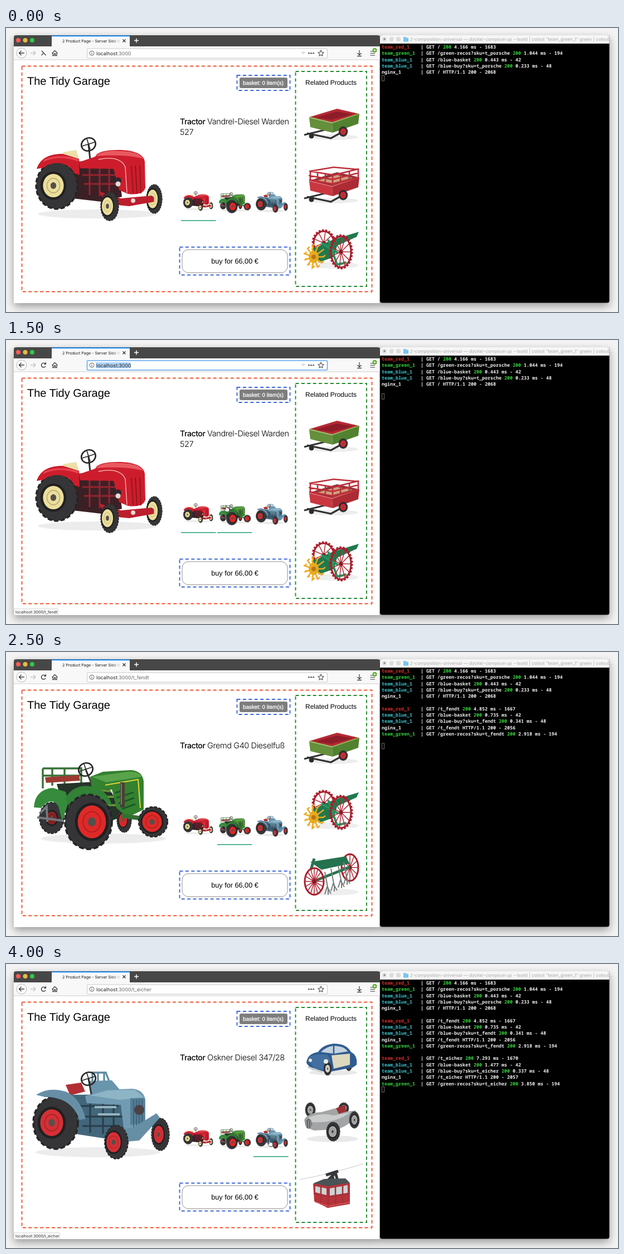
Recreate the animation shown at these times as an HTML page. Size 1098 by 510 pixels, loop 5 s.

```html
<!DOCTYPE html>
<html lang="en">
<head>
<meta charset="utf-8">
<title>Product page</title>
<style>
html, body { margin: 0; height: 100%; overflow: hidden; background: #f4f4f4; }
svg { display: block; width: 100vw; height: 100vh; }
text { white-space: pre; text-rendering: geometricPrecision; }
.ui { font-family: Inter, sans-serif; }
.page { font-family: "Liberation Sans", Arial, sans-serif; }
.mono { font: 600 8.333px "Noto Sans Mono", monospace; }
.shadow { filter: drop-shadow(0 6px 8px rgba(0,0,0,.38)); }
</style>
</head>
<body>
<svg id="stage" viewBox="0 0 1098 510"></svg>
<script>
// Drawing helpers
const E = (x, y, rx, ry, fill, more = '') => `<ellipse cx="${x}" cy="${y}" rx="${rx}" ry="${ry}" fill="${fill}" ${more}/>`;
const C = (x, y, r, fill, more) => E(x, y, r, r, fill, more);
const R = (x, y, w, h, fill, more = '') => `<rect x="${x}" y="${y}" width="${w}" height="${h}" fill="${fill}" ${more}/>`;
const P = (d, fill) => `<path d="${d}" fill="${fill}"/>`;
const L = (d, stroke, w = 1, more = '') => `<path d="${d}" fill="none" stroke="${stroke}" stroke-width="${w}" ${more}/>`;
const T = (x, y, size, str, more = 'class="ui"') => `<text x="${x}" y="${y}" font-size="${size}" ${more}>${str}</text>`;
const dashed = (x, y, w, h, color) => R(x, y, w, h, 'none', `stroke="${color}" stroke-width="1.9" stroke-dasharray="6 4.4"`);

const wheel = (x, y, rx, ry, rim, dx = 0, k = .54) =>
  E(x, y, rx - 1, ry - 1, '#353537', `stroke="#242426" stroke-width="${rx / 12}" stroke-dasharray="${rx / 5} ${rx / 9}"`) +
  E(x + dx, y, rx * (k + .12), ry * (k + .1), '#202022') +
  E(x + dx, y, rx * k, ry * k, rim) +
  E(x + dx, y, rx * k * .62, ry * k * .62, 'none', `stroke="#0003" stroke-width="${rx / 20}"`) +
  E(x + dx, y, rx * k * .28, ry * k * .28, '#55504a');

const steering = (x, y, bx, by) =>
  L(`M${x} ${y}L${bx} ${by}`, '#333', 3) +
  E(x, y, 13, 11.5, 'none', `stroke="#252525" stroke-width="2.6" transform="rotate(-25 ${x} ${y})"`) +
  L(`M${x - 11} ${y + 3}L${x + 11} ${y - 4}M${x - 3} ${y - 10}L${x + 3} ${y + 9}`, '#252525', 1.6);

const spoked = (x, y, rx, ry, n, teeth) => {
  let d = '';
  for (let i = 0; i < n; i++) {
    const a = i * 2 * Math.PI / n;
    d += `M${x} ${y}l${rx * Math.cos(a)} ${ry * Math.sin(a)}`;
  }
  const ring = (grow, w, dash) => E(x, y, rx + grow, ry + grow, 'none', `stroke="#a81f2c" stroke-width="${w}" ${dash}`);
  return L(d, '#b22835', 1.5) + ring(0, 3, '') + (teeth ? ring(2, 3, 'stroke-dasharray="3.5 2.6"') : '') + C(x, y, 3.6, '#8d1823');
};

const redTractor =
  E(165, 334, 108, 8, '#ececec') +
  P('M102 223L126 219L131 235L109 238Z', '#eddfa9') +
  P('M112 240L200 238L208 303L172 312L120 306Z', '#3b2025') +
  L('M133 250H190M137 264H196M140 280H197M150 247V300M168 246V302M185 248V300', '#942430', 3) +
  wheel(266, 307, 15, 27, '#ecdf9c', -3, .62) +
  wheel(91, 283, 38, 43, '#ecdf9c', -6, .49) +
  P('M55 253C62 232 80 226 102 226L131 235L132 264L123 261C113 240 85 237 67 251Z', '#cd1d2c') +
  P('M66 241Q95 226 130 240L129 235Q94 225 69 236Z', '#e64551') +
  steering(148, 209, 151, 236) +
  P('M131 241L160 231Q165 218 207 219Q246 221 249 240L250 287Q246 301 219 298L203 291L193 253L133 252Z', '#cd1d2c') +
  P('M161 230Q173 218 207 221Q239 222 246 235Q218 226 161 230Z', '#e85960') +
  L('M166 236Q205 228 214 250L217 296', '#f1c1bd', 1.3) +
  L('M225 248L228 296M232 247L235 298M240 247L242 297', '#98151f', 2) +
  C(201, 274, 6, '#30292c') + C(201, 280, 4.5, '#dedede') +
  P('M166 293L206 306L262 301L266 312L221 320L181 316Z', '#bd1e2c') +
  C(228, 310, 4, '#e5dad4') +
  wheel(186, 320, 17, 27, '#ecdf9c', -4, .59);

const greenTractor =
  E(175, 335, 112, 9, '#ececec') +
  wheel(82, 298, 23, 29, '#8b2323', 0, .4) +
  L('M66 209H136M66 222H136M66 209V245M83 208V240M105 208V240M135 207V244', '#397239', 3.4) +
  P('M70 225L131 221L133 231L72 235Z', '#9d3931') +
  P('M91 237L177 232L214 293L185 305L110 300Z', '#263329') +
  L('M145 246L188 250M168 260H207M174 275H210', '#64923b', 4) +
  P('M50 279Q52 247 84 244L107 251L112 269L101 304L94 277Q82 258 63 280Z', '#368b3c') +
  P('M106 263Q121 237 151 241Q181 245 190 275L176 270Q144 242 117 283Z', '#328136') +
  wheel(212, 302, 14, 23, '#df2928', -2, .52) +
  steering(143, 211, 155, 240) +
  P('M151 224L174 215L224 212Q244 213 247 232L247 283L218 297L198 280L190 247L154 246Z', '#34812f') +
  P('M154 224L220 215Q239 214 243 224L180 234Z', '#59a34b') +
  L('M178 239L237 229L241 280', '#d7d53b', 2.1) +
  L('M196 253L211 248M198 262L229 252M202 272L230 262M208 282L232 273', '#1d5827', 3) +
  L('M209 234V279', '#4c3d36', 8) + L('M207 236V274', '#968277', 1.5) +
  L('M208 294L252 300', '#346f31', 8) +
  wheel(264, 305, 27, 28, '#df2928', -2, .65) +
  wheel(148, 305, 43, 50, '#df2928', 6, .59) +
  L('M61 289L73 278L74 305M56 297L103 303', '#73787a', 4);

const blueTractor =
  E(165, 338, 112, 9, '#ececec') +
  L('M155 214V195H179L188 218M165 194V215M176 195V219', '#5d8ba4', 3.3) +
  P('M151 210L190 209L207 229L152 239Z', '#6995ad') +
  P('M107 217L135 213L142 229L115 236Z', '#b22e34') +
  P('M103 235L205 234L225 302L182 314L117 304Z', '#42677c') +
  L('M126 255H202M130 274H210M137 291H203M151 245V303M174 247V305M193 249V308', '#293d48', 3) +
  wheel(277, 306, 17, 30, '#d62f36', -3, .52) +
  wheel(89, 285, 41, 48, '#d62f36', -7, .5) +
  P('M54 235Q76 220 107 229Q133 240 143 278L132 280Q117 238 70 239Z', '#668fa6') +
  steering(148, 206, 153, 234) +
  P('M142 237L180 226L227 224Q247 226 250 244L250 302L226 307L211 294L206 253L145 250Z', '#719bb2') +
  P('M151 236L182 227L231 226L247 239L205 244Z', '#8eb5c6') +
  P('M223 241H249V286L223 289Z', '#557d95') +
  L('M229 243V300M234 243V300M239 243V300M244 243V300', '#365b72', 1.3) +
  C(239, 262, 9, '#4a4143') +
  L('M159 257H198M165 270H204', '#96b4c1', 4) +
  P('M194 298L228 294L270 268L276 276L239 317L205 320Z', '#668fa6') +
  wheel(198, 320, 22, 31, '#d62f36', -5, .58);

const cart = (body, top, fence) =>
  E(588, 196, 44, 5, '#ededed') +
  L('M535 192L572 183M540 189L583 198L606 185', '#333', 3.2) + C(548, 194, 4.5, '#2c2c2c') +
  P('M544 160L594 145L633 154L585 170Z', fence ? '#8c303a' : '#b52934') +
  P('M554 161L594 150L622 155L584 165Z', fence ? '#cfa07d' : '#8e1b28') +
  P('M544 161L585 171L586 188L546 178Z', body) +
  P('M585 171L634 154L632 172L586 188Z', top) +
  L('M544 160L585 170L633 154', fence ? '#d64c50' : '#93b554', 1.5) +
  (fence ? L('M544 158L586 166L633 154M543 151L586 158L633 146M544 143L588 150L633 139M546 143L588 136L631 140M546 142V160M559 145V162M573 148V165M586 150V168M600 147V164M616 143V160M632 139V156', '#bc303a', 2.7) : '') +
  wheel(605, 186, 9, 10, '#d32b36', 0, .6);

const greenCart = cart('#648f3b', '#52812f', false);
const redCart = cart('#c93740', '#ad2b34', true);

const planter =
  E(588, 426, 45, 6, '#eeeeee') +
  spoked(570, 386, 18, 21, 9, true) +
  P('M548 397L587 380L633 366L629 375L594 391L589 411L561 421Z', '#20794e') +
  L('M566 386L596 404M578 380L594 425L611 421', '#2a9260', 4) +
  L('M552 411' + Array.from({ length: 11 }, (_, i) => {
    const a = i * 2 * Math.PI / 11;
    return `M552 411l${17 * Math.cos(a)} ${20 * Math.sin(a)}l4 -3`;
  }).join(''), '#eca91e', 2.5) +
  E(552, 411, 9, 11, '#e9a91c') + C(552, 411, 4, '#b8751c') +
  spoked(601, 402, 18, 28, 11, true);

const rake =
  E(586, 431, 47, 6, '#eeeeee') +
  spoked(617, 387, 15, 24, 12) +
  P('M546 377L609 367L617 380L566 391Z', '#24734e') +
  L('M554 411L617 386M553 371L547 391', '#28734f', 5) +
  spoked(553, 412, 17, 24, 16) +
  [574, 585, 598, 608].map((x, i) => {
    const y = 427 - i * 6;
    return L(`M${x - 2} ${y - 32}L${x + 4} ${y}M${x - 2} ${y + 8}L${x + 2} ${y - 5}L${x + 9} ${y + 7}M${x + 4} ${y - 4}V${y + 9}`, '#777d7e', 2);
  }).join('');

const smallCar =
  E(587, 195, 43, 5, '#e8e8e8') +
  wheel(615, 181, 7, 12, '#d4d4d4', 0, .55) +
  P('M539 178Q540 161 560 158Q568 145 588 143Q611 143 619 158Q631 164 629 181L622 186L578 194L549 190Z', '#315c91') +
  P('M565 158Q575 148 588 147Q607 147 613 157L588 161Z', '#c2d3dd') +
  L('M588 146V162', '#315c91', 2.5) +
  P('M584 164L617 161V181L588 188Z', '#ded9bd') +
  P('M541 169Q552 160 576 163Q585 171 580 191L553 188Z', '#426f9f') +
  wheel(577, 188, 8, 13, '#d4d4d4', 0, .54) +
  C(546, 173, 3, '#e8e7d5') + C(574, 175, 4, '#eceae0') +
  L('M541 185L568 194', '#cfd2d3', 3);

const racer =
  E(586, 314, 46, 6, '#e9e9e9') +
  wheel(546, 262, 10, 14, '#aaa') + wheel(606, 259, 10, 11, '#999') +
  L('M540 281L591 302M555 272L620 280', '#777', 3) +
  P('M535 280Q541 267 566 266L591 259L611 265L628 263Q625 288 593 297L553 299Q537 295 535 280Z', '#a2a5a6') +
  P('M543 276Q563 266 588 272L618 266Q594 286 549 284Z', '#cacccc') +
  P('M592 259L608 253L611 265L597 269Z', '#9c3033') +
  E(543, 287, 6, 9, '#646769') + L('M539 282V293M543 280V296M547 281V294', '#bbb', 1) +
  wheel(587, 301, 13, 18, '#a7a8a7', -1, .56) + wheel(625, 280, 10, 16, '#aaa');

const cabin =
  L('M527 387Q583 377 640 359', '#c8c8c8', 1) +
  L('M574 379L596 372M585 376L588 393M577 389L591 375L595 389', '#34383a', 5) +
  P('M551 395L569 387L609 386L617 394V431L577 438L553 426Z', '#b6343b') +
  P('M551 394L571 386L609 385L617 393L578 399Z', '#4a5355') +
  P('M555 399L575 403V415L555 410Z', '#c9d5d6') +
  P('M581 403L613 397V411L581 416Z', '#c9d5d6') +
  L('M565 398V432M591 399V435M604 398V433M578 399V438M552 412L578 418L617 412', '#a8303a', 2.6) +
  L('M554 427L578 435L617 428', '#d85a59', 1.5);

const down = (dy, art) => `<g transform="translate(0 ${dy})">${art}</g>`;

const pages = [
  { path: '', name: ['Vandrel-Diesel Warden', '527'], big: redTractor,
    related: [greenCart, down(114, redCart), planter],
    log: ['red / 200 4.166 ms - 1683', 'green /green-recos?sku=t_porsche 200 1.044 ms - 194', 'blue /blue-basket 200 0.443 ms - 42',
      'blue /blue-buy?sku=t_porsche 200 0.233 ms - 48', 'nginx / HTTP/1.1 200 - 2068'] },
  { path: '/t_fendt', name: ['Gremd G40 Dieselfuß'], big: greenTractor,
    related: [greenCart, down(-114, planter), rake],
    log: ['red /t_fendt 200 4.852 ms - 1667', 'blue /blue-basket 200 0.735 ms - 42', 'blue /blue-buy?sku=t_fendt 200 0.341 ms - 48',
      'nginx /t_fendt HTTP/1.1 200 - 2056', 'green /green-recos?sku=t_fendt 200 2.918 ms - 194'] },
  { path: '/t_eicher', name: ['Oskner Diesel 347/28'], big: blueTractor,
    related: [smallCar, racer, cabin],
    log: ['red /t_eicher 200 7.293 ms - 1670', 'blue /blue-basket 200 1.477 ms - 42', 'blue /blue-buy?sku=t_eicher 200 0.337 ms - 48',
      'nginx /t_eicher HTTP/1.1 200 - 2057', 'green /green-recos?sku=t_eicher 200 3.850 ms - 194'] }
];

const thumbs = [[305.5, 247, .235, redTractor], [370, 248, .238, greenTractor], [437, 249.5, .234, blueTractor]]
  .map(([x, y, s, art]) => `<g transform="translate(${x} ${y}) scale(${s})">${art}</g>`).join('');

const frame =
  `<defs><linearGradient id="fade" gradientUnits="userSpaceOnUse" x1="188" x2="206"><stop stop-color="#111"/><stop offset="1" stop-color="#111" stop-opacity="0"/></linearGradient></defs>` +
  R(0, 0, 1098, 510, '#f4f4f4') +
  `<g class="shadow">${R(671, 13, 411.5, 480.5, '#000', 'rx="4"')}${R(14, 13, 657, 481, '#474747', 'rx="4"')}</g>` +
  P('M14 33H670.5V494H14Z', '#fff') +
  R(14, 33, 656.5, 24, '#f8f8f9') + R(14, 56.5, 656.5, 1, '#cfcfcf') +
  R(82, 14, 140, 19, '#f8f8f9') + R(82, 13.5, 140, 1.7, '#168cff') +
  C(22, 22, 4, '#fc5b57') + C(34.5, 22, 4, '#e5bf3c') + C(47, 22, 4, '#34c748') +
  T(101, 26, 7.05, '2 Product Page - Server Side R', 'class="ui" fill="url(#fade)"') +
  L('M209.5 20.5l5 5m0 -5l-5 5', '#333', 1.3) + L('M230 22.5h8m-4 -4v8', '#fff', 1.4) +
  C(28, 45, 9, '#fff', 'stroke="#b5b5b5"') + L('M33 45H23.5M27.5 41L23.5 45L27.5 49', '#3d3d3d', 1.4) +
  L('M44 45H53M49 41L53 45L49 49', '#c4c4c4', 1.4) +
  L('M82.5 45.5L87.5 40.5L92.5 45.5M84 45V49.5H86.5V46H88.5V49.5H91V45', '#444', 1.3) +
  L('M634 40V48M630.5 45L634 48.5L637.5 45M630 50.5H638', '#444', 1.3) +
  L('M653.5 42H662M653.5 45.5H662M653.5 49H662', '#444', 1.2) +
  C(661.5, 40, 4, '#5cae35') + L('M659.5 40h4m-2 -2v4', '#fff', 1) +
  P('M671 28V17Q671 13 675 13H1078Q1082.5 13 1082.5 17V28Z', '#f6f6f6') +
  [679, 691.5, 704].map(x => C(x, 20, 4, '#dcdcdc')).join('') + C(679, 20, 1.4, '#777') +
  P('M713 16H717L718 17.5H722V24.5H713Z', '#78c5ee') +
  T(725, 23, 8.05, '2-composition-universal — docker-compose up --build | colout "team_green_1" green | colout…', 'class="ui" fill="#aaa"') +
  T(38, 101.5, 20, 'The Tidy Garage', 'class="page"') +
  dashed(28.5, 68.5, 628, 405, '#f2532c') +
  dashed(519.5, 78, 127.5, 386, '#228c2b') +
  dashed(414.5, 85, 95, 27, '#3b66dc') + dashed(311.5, 393.5, 198, 50, '#3b66dc') +
  R(419, 89, 86, 19, '#7d7d7d', 'rx="3"') +
  T(461.5, 102, 9.9, 'basket: 0 item(s)', 'class="page" text-anchor="middle" fill="#fff" stroke="#fff" stroke-width=".3"') +
  T(583, 102, 12, 'Related Products', 'class="page" text-anchor="middle"') +
  R(316, 398, 189, 41.5, '#fff', 'rx="11" stroke="#909090"') +
  T(410.5, 423, 12.7, 'buy for 66,00 €', 'class="page" text-anchor="middle"') +
  thumbs;

const colors = { red: '#d5302c', green: '#35d13d', blue: '#3cc6d2', nginx: '#f0f0f0' };

function terminal(page, typed) {
  const line = i => 37.2 + i * 11.27;
  let out = '';
  for (let p = 0; p <= page; p++) pages[p].log.forEach((entry, i) => {
    const [team, ...rest] = entry.split(' ');
    const y = line(p * 6 + i), nginx = team === 'nginx';
    let msg = rest.join(' ');
    if (!nginx) msg = msg.replace(' 200 ', ` <tspan fill="${colors.green}">200</tspan> `);
    out += `<text class="mono" x="674" y="${y}" style="font-weight:700" fill="${colors[team]}">${nginx ? 'nginx_1' : `team_${team}_1`}</text>` +
      `<text class="mono" x="744" y="${y}" fill="#f0f0f0">| GET ${msg}</text>`;
  });
  return out + R(674.5, line(page * 6 + 5 + typed) - 8.6, 4, 10, 'none', 'stroke="#777" stroke-width=".9"');
}

const icons = {
  reload: L('M70.5 42.5A4 4 0 1 0 71 47', '#444', 1.4) + P('M72 39.5V44H67.5Z', '#444'),
  stop: L('M63.5 41L71.5 49M71.5 41L63.5 49', '#444', 1.4),
  turning: L('M64 41L71.5 49M67 45.5L63.5 49', '#444', 1.4)
};

function addressBar(path, focus, icon) {
  return icons[icon] +
    R(145.5, 37, 431, 17, '#fff', `rx="2" stroke="${focus ? '#62a9f0' : '#c9c9c9'}" stroke-width="${focus ? 1.6 : 1}"`) +
    (focus ? R(161, 40, 62.5, 11, '#b0d3f7') : '') +
    C(154, 45.2, 4, 'none', 'stroke="#666"') + L('M154 44.5V47.5M154 42.5V43.5', '#666', 1.1) +
    T(162, 48.6, 8.85, `localhost<tspan fill="${focus ? '#222' : '#666'}">:3000${path}</tspan>`, 'class="ui" fill="#222"') +
    (path ? '' : L('M530.5 43.5H536L533.2 47Z', '#bbb', .9)) +
    [543.5, 547.5, 551.5].map(x => C(x, 45.2, 1.3, '#444')).join('') +
    L('M565 40L566.5 43.5L570 44L567.5 46.5L568 50L565 48.2L562 50L562.5 46.5L560 44L563.5 43.5Z', '#555', 1.1);
}

const pointer = {
  beam: (x, y) => L(`M${x - 2} ${y - 5}Q${x} ${y - 5} ${x} ${y - 3}V${y + 3}Q${x} ${y + 5} ${x - 2} ${y + 5}M${x + 2} ${y - 5}Q${x} ${y - 5} ${x} ${y - 3}M${x} ${y + 3}Q${x} ${y + 5} ${x + 2} ${y + 5}`, '#222', 1),
  arrow: (x, y) => `<path d="M${x} ${y}v11l2.6 -2.4l2 4l1.8 -.9l-1.9 -3.9h3.6Z" fill="#111" stroke="#fff" stroke-width=".8"/>`,
  hand: (x, y) => `<path d="M${x} ${y}q1.3 -1 1.8 .6v3.4l4.4 1q1.2 3 -.4 6.5h-5.2l-3.6 -4.5q.4 -1.6 2 -.2l1 .8Z" fill="#fff" stroke="#222" stroke-width=".8"/>`,
  press: (x, y) => C(x, y, 18, '#0001', 'stroke="#151515" stroke-width="2.2"')
};

// One entry per half second
const steps = [
  { page: 0, icon: 'turning' },
  { page: 0, typed: 1, focus: 1, at: ['beam', 296, 47] },
  { page: 0, typed: 1, focus: 1, at: ['arrow', 350, 170] },
  { page: 0, typed: 1, focus: 1, hover: 1, at: ['hand', 394, 297] },
  { page: 1, icon: 'stop', hover: 1, at: ['hand', 402, 297] },
  { page: 1, typed: 1 },
  { page: 1, typed: 1, hover: 2, at: ['press', 472, 317] },
  { page: 2, icon: 'stop', hover: 2, at: ['hand', 472, 316] },
  { page: 2, hover: 2, at: ['hand', 472, 316] }
];

function scene({ page, icon = 'reload', typed = 0, focus, hover, at }) {
  const { path, name, big, related } = pages[page];
  const underline = i => R(314 + i * 65, 345, 62.5, 1.5, '#20a36e');
  let out = frame + addressBar(path, focus, icon) + big + related.join('') + underline(page) +
    `<text class="ui" x="312" y="173" font-size="14.5" letter-spacing="-.4" font-weight="300"><tspan font-size="14.2" font-weight="500" letter-spacing="-.5">Tractor</tspan> ${name[0]}</text>` +
    (name[1] ? T(312, 191.5, 14.5, name[1], 'class="ui" font-weight="300" letter-spacing="-.4"') : '');
  if (hover) {
    const link = pages[hover].path;
    out += (hover !== page ? underline(hover) : '') +
      R(14.5, 482.5, link.length > 8 ? 82 : 79, 11.5, '#f8f8f8', 'rx="1.5" stroke="#d2d2d2" stroke-width=".8"') +
      T(17, 491, 7.05, 'localhost:3000' + link, 'class="ui" fill="#333"');
  }
  out += terminal(page, typed);
  return at ? out + pointer[at[0]](at[1], at[2]) : out;
}

const stage = document.getElementById('stage');
let shown = -1;
function draw() {
  const step = Math.min(Math.floor(performance.now() % 5000 / 500), steps.length - 1);
  if (step !== shown) stage.innerHTML = scene(steps[shown = step]);
  requestAnimationFrame(draw);
}
draw();
</script>
</body>
</html>
```
